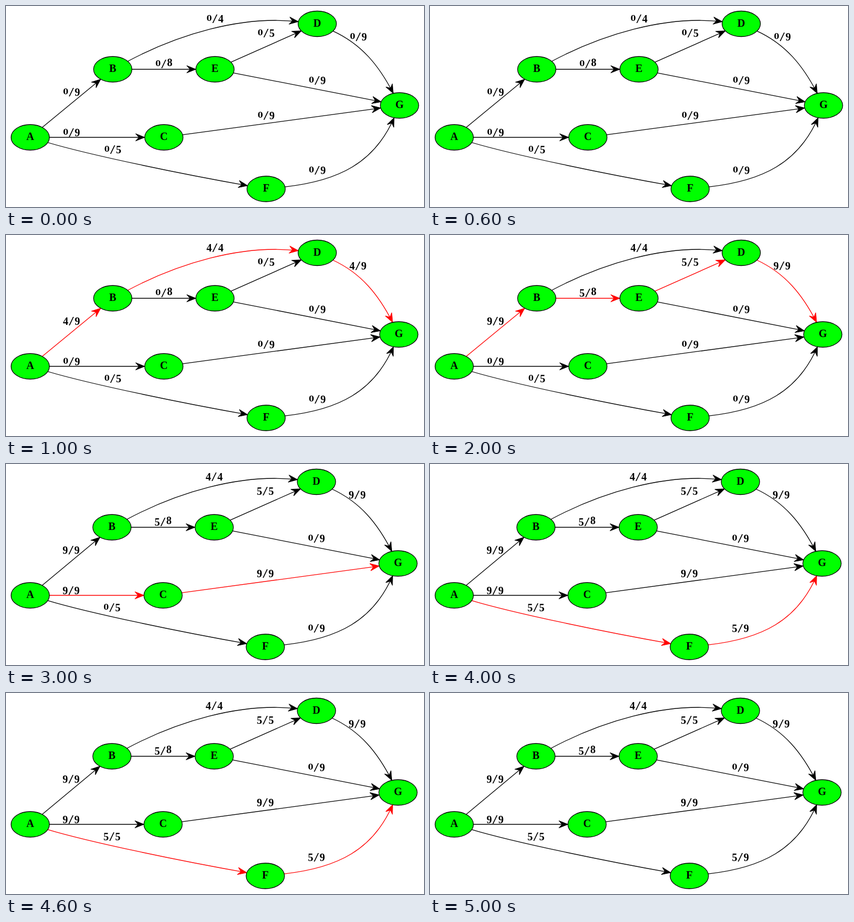
An HTML page for the animation above (6 s loop, 785 by 378 pixels).

```html
<!DOCTYPE html>
<html lang="en">
<head>
<meta charset="utf-8">
<title>Maximum flow</title>
<style>
html, body { margin: 0; width: 100%; height: 100%; overflow: hidden; background: #fff; }
svg { display: block; width: 100%; height: 100%; }
ellipse { fill: #0f0; stroke: #000; stroke-width: 1.3; }
text { font: bold 20px "Liberation Serif", serif; text-anchor: middle; }
.zero { font: bold 14px "DejaVu Serif", serif; }
.slash { font: 20px "DejaVu Sans Mono", monospace; }
.line { fill: none; stroke-width: 1.3; }
</style>
</head>
<body>
<svg id="stage" viewBox="0 0 785 378"></svg>
<script>
const STEP = 1000, RX = 36, RY = 24;

// Places are [rank, y]; ranks are the columns of the layout.
const nodes = {
  A: [0, 247], B: [1, 119], C: [2, 247], E: [3, 119],
  F: [4, 344], D: [5, 33.5], G: [6, 187]
};
// Optional bend: the two control points of a curved edge.
const edges = {
  AB: { cap: 9, at: [0.5, 162] },
  AC: { cap: 9, at: [0.5, 238] },
  AF: { cap: 5, at: [1, 270], bend: [[0.74, 281], [2.35, 316]] },
  BD: { cap: 4, at: [3, 24], bend: [[2.25, 55], [3.5, 17]] },
  BE: { cap: 8, at: [2, 109] },
  CG: { cap: 9, at: [4, 206] },
  DG: { cap: 9, at: [5.5, 58], bend: [[5.54, 72], [5.75, 112]] },
  ED: { cap: 5, at: [4, 51] },
  EG: { cap: 9, at: [5, 140] },
  FG: { cap: 9, at: [5, 309], bend: [[5.26, 329], [5.695, 295]] }
};
const augment = [["", 0], ["ABDG", 4], ["ABEDG", 5], ["ACG", 9], ["AFG", 5], ["", 0]];

const stage = document.getElementById("stage");
const clamp = (v, max) => Math.min(Math.max(v, 0), max);
const tag = (name, attrs, body = "") =>
  `<${name} ${Object.entries(attrs).map(([k, v]) => `${k}="${v}"`).join(" ")}>${body}</${name}>`;

// The outer gaps tighten as their labels get narrower.
function place([rank, y], step) {
  const first = step > 2 ? 153.5 : 155;
  const last = step > 0 ? 153.2 : 154.5;
  return [45.5 + first * clamp(rank, 1) + 96 * clamp(rank - 1, 4) + last * clamp(rank - 5, 1), y];
}

// Point on the rim of the node at (x, y), facing (tx, ty).
function rim([x, y], [tx, ty]) {
  const dx = tx - x, dy = ty - y, k = Math.hypot(dx / RX, dy / RY);
  return [x + dx / k, y + dy / k];
}

function digit(d, x, y) {
  const low = d !== 0 && d !== 8;
  return tag("tspan", { x, y: y + (low ? 7 : 4), class: d === 0 ? "zero" : "digit" }, d);
}

function label(flow, cap, [x, y]) {
  return tag("text", {},
    digit(flow, x - 11, y) +
    tag("tspan", { x, y: y + 6, class: "slash" }, "/") +
    digit(cap, x + 11, y));
}

function edge(id, step, flow, color) {
  const { cap, at, bend } = edges[id];
  const [from, to] = [...id].map(n => place(nodes[n], step));
  const [c1, c2] = bend ? bend.map(p => place(p, step)) : [to, from];
  const tail = rim(from, c1), tip = rim(to, c2);
  const angle = Math.atan2(tip[1] - c2[1], tip[0] - c2[0]) * 180 / Math.PI;
  const d = bend ? `M${tail}C${c1} ${c2} ${tip}` : `M${tail}L${tip}`;
  return tag("path", { class: "line", d, stroke: color }) +
    tag("path", {
      d: "M0,0L-17,-6.8L-11,0L-17,6.8Z", fill: color, stroke: color,
      transform: `translate(${tip}) rotate(${angle})`
    }) +
    label(flow, cap, place(at, step));
}

function node(id, step) {
  const [cx, cy] = place(nodes[id], step);
  return tag("ellipse", { cx, cy, rx: RX, ry: RY }) +
    tag("text", { x: cx, y: cy + 5 }, id);
}

function draw(step) {
  const flowOf = id => augment.slice(0, step + 1)
    .reduce((sum, [path, n]) => sum + (path.includes(id) ? n : 0), 0);
  const active = augment[step][0];
  stage.innerHTML =
    Object.keys(edges).map(id =>
      edge(id, step, flowOf(id), active.includes(id) ? "#f00" : "#000")).join("") +
    Object.keys(nodes).map(id => node(id, step)).join("");
}

let shown = -1;
const start = performance.now();
function tick() {
  const step = Math.floor((performance.now() - start) / STEP) % augment.length;
  if (step !== shown) draw(shown = step);
  requestAnimationFrame(tick);
}
tick();
</script>
</body>
</html>
```
